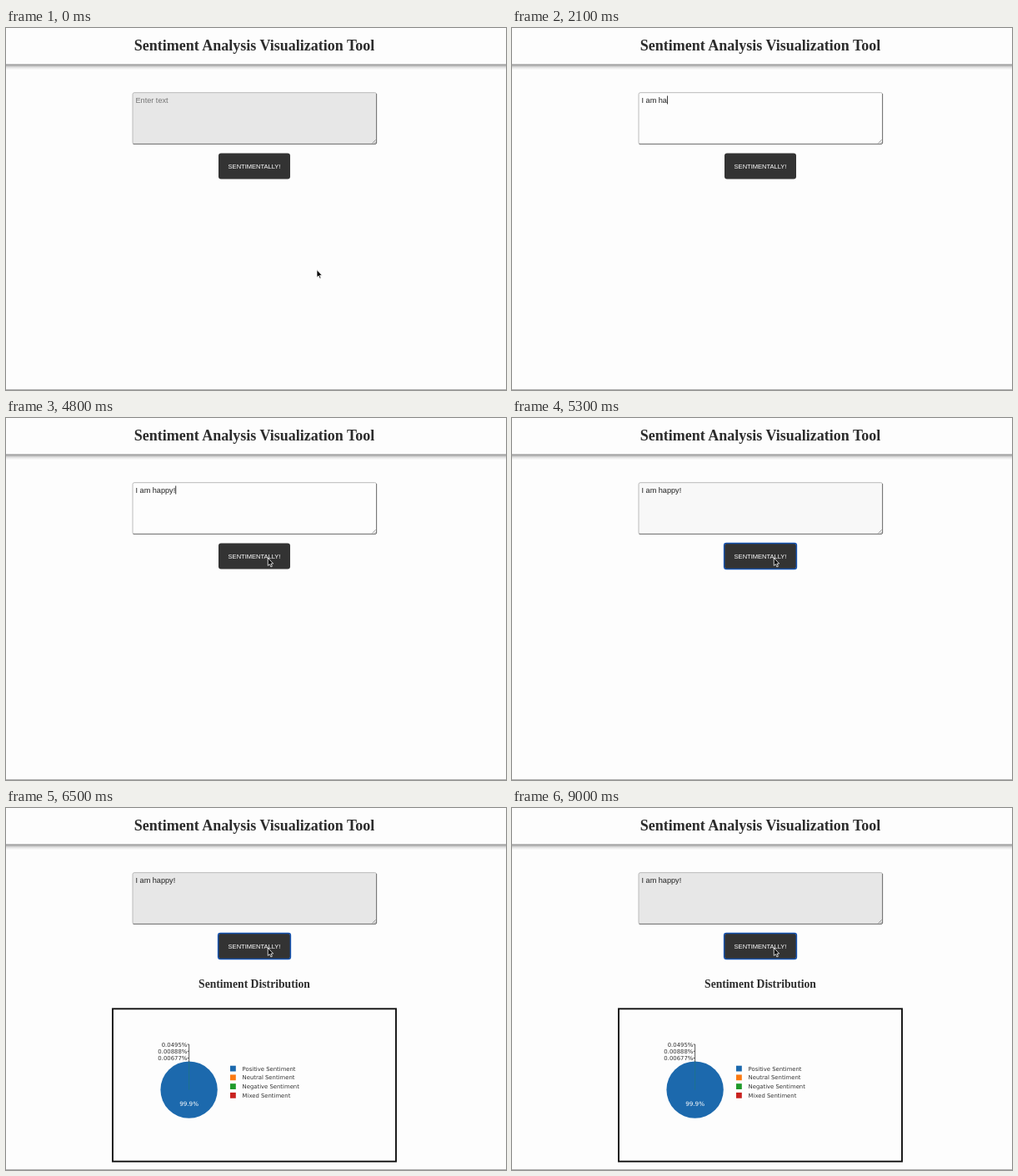
Animation, 600 px wide and 435 px high, one loop 9.1 s. Source, as an HTML page:

```html
<!DOCTYPE html>
<html lang="en">
<head>
<meta charset="utf-8">
<title>Sentiment Analysis Visualization Tool</title>
<style>
  html, body { margin: 0; width: 100%; height: 100%; overflow: hidden; background: #fdfdfd; }
  svg { display: block; width: 600px; height: 435px; }
  .serif { font-family: "Liberation Serif", serif; font-weight: bold; fill: #2c2c2c; text-anchor: middle; }
  .sans { font-family: "Liberation Sans", sans-serif; }
  .chart { font: 6.9px "DejaVu Sans", sans-serif; fill: #333; }
</style>
</head>
<body>
<svg viewBox="0 0 600 435">
  <defs>
    <linearGradient id="shadow" x2="0" y2="1">
      <stop offset="0" stop-color="#888"/>
      <stop offset=".25" stop-color="#b8b8b8"/>
      <stop offset=".6" stop-color="#e8e8e8"/>
      <stop offset="1" stop-color="#fdfdfd"/>
    </linearGradient>
  </defs>
  <rect width="600" height="435" fill="#fdfdfd"/>
  <rect y="43.5" width="600" height="7" fill="url(#shadow)"/>
  <text class="serif" x="298" y="27" font-size="18">Sentiment Analysis Visualization Tool</text>
  <path d="M0 434.5H600" stroke="#b0b0b0"/>

  <rect id="field" x="152" y="77.7" width="292.6" height="61.8" rx="2" stroke="#b4b4b4" stroke-width=".9"/>
  <path d="M152.6 139.4H443Q444.6 139.4 444.6 138V79" fill="none" stroke="#686868" stroke-width=".9"/>
  <path d="M439.5 138.5L443.7 134.3M442 138.5L443.7 136.8" stroke="#777" stroke-width=".7"/>
  <text id="entry" class="sans" x="155.5" y="89.6" font-size="9.15" xml:space="preserve"></text>
  <rect id="caret" y="81.5" width=".9" height="10" fill="#222"/>

  <rect x="255" y="150.5" width="86" height="31" rx="3" fill="#333"/>
  <rect id="ring" x="254.6" y="150.4" width="86.8" height="31.2" rx="2.5" fill="none" stroke="#1653b0" stroke-width="1.5"/>
  <text class="sans" x="298" y="168.6" font-size="7.53" fill="#fff" text-anchor="middle">SENTIMENTALLY!</text>

  <g id="results">
    <text class="serif" x="298" y="215.6" font-size="13.67">Sentiment Distribution</text>
    <rect x="128" y="241.3" width="340" height="183.4" fill="#fdfdfd" stroke="#111" stroke-width="1.9"/>
    <circle cx="219.6" cy="338.6" r="34.2" fill="#1c69ad"/>
    <path d="M219.6 338.6V304.5" stroke="#1f7a78" stroke-width=".6"/>
    <path d="M217.6 284H219.6V305M217.6 292.3H219.6M217.6 300.5H219.6" fill="none" stroke="#333" stroke-width=".8"/>
    <g id="labels" class="chart" text-anchor="end"></g>
    <text class="chart" x="219.6" y="358.4" style="fill:#fff;font-size:7.2px" text-anchor="middle">99.9%</text>
    <g id="legend" class="chart"></g>
  </g>

  <path id="arrow" d="M0 0V9.2L2.1 7.3L3.6 10.7L5.1 10L3.6 6.8H6.4Z" fill="#000" stroke="#fff" stroke-width=".8"/>
  <path id="beam" d="M-2 -5Q0 -5 0 -4Q0 -5 2 -5M0 -4V4M-2 5Q0 5 0 4Q0 5 2 5" fill="none" stroke="#222" stroke-width=".9"/>
</svg>
<script>
const LOOP = 9100, STEP = 100;
const $ = id => document.getElementById(id);
const show = (id, on) => $(id).setAttribute('visibility', on ? 'visible' : 'hidden');
const ramp = (t, from, to) => Math.min(1, Math.max(0, (t - from) / (to - from)));

$('labels').innerHTML = ['0.0495%', '0.00888%', '0.00677%']
  .map((label, i) => `<text x="217.4" y="${286.8 + i * 8.25}">${label}</text>`).join('');
$('legend').innerHTML = [['Positive', '#1c69ad'], ['Neutral', '#fb7a12'], ['Negative', '#1f9a2a'], ['Mixed', '#c9221f']]
  .map(([name, color], i) => {
    const y = 313.1 + i * 10.75;
    return `<rect x="269" y="${y - 3.4}" width="6.8" height="6.8" fill="${color}"/>` +
      `<text x="283.6" y="${y + 2.4}" style="font-size:6.85px">${name} Sentiment</text>`;
  }).join('');

// [time, characters typed]
const typing = [[1000, 1], [1200, 2], [1300, 3], [1400, 4], [1600, 5], [2000, 6],
  [2100, 7], [2800, 8], [2900, 9], [3100, 10], [3800, 11]];
// [from, to] while the caret is lit
const caretOn = [[500, 2600], [2800, 3600], [3800, 4300], [4800, 5300]];
// [time, x, y] of the pointer
const pointer = [[0, 373, 290.5], [100, 364, 268], [200, 343, 218], [300, 319, 163], [400, 302, 126],
  [500, 297, 115], [4000, 297, 115], [4100, 322, 119], [4200, 350, 133], [4300, 360, 154],
  [4400, 334, 166], [4500, 314.3, 168.2]];

function pointerAt(t) {
  const next = pointer.findIndex(p => p[0] > t);
  if (next < 0) return pointer.at(-1).slice(1);
  const [t0, x0, y0] = pointer[next - 1], [t1, x1, y1] = pointer[next];
  const k = ramp(t, t0, t1);
  return [x0 + (x1 - x0) * k, y0 + (y1 - y0) * k];
}

function draw(now) {
  const t = Math.floor(now % LOOP / STEP) * STEP;

  const focus = ramp(t, 200, 500) - ramp(t, 5200, 5600);
  const shade = Math.round(231 + 22 * focus);
  $('field').setAttribute('fill', `rgb(${shade},${shade},${shade})`);

  const count = typing.filter(([at]) => at <= t).length;
  const entry = $('entry');
  entry.textContent = count ? 'I am happy!'.slice(0, count) : 'Enter text';
  entry.setAttribute('fill', count ? '#222' : '#757575');
  $('caret').setAttribute('x', 155.6 + (count ? entry.getComputedTextLength() : 0));
  show('caret', caretOn.some(([from, to]) => t >= from && t < to));

  show('ring', t >= 5300);
  show('results', t >= 6500);

  const [x, y] = pointerAt(t);
  const hidden = t >= 1000 && t < 4100;
  const overField = x > 152 && x < 445 && y > 77 && y < 140;
  for (const id of ['arrow', 'beam']) {
    $(id).setAttribute('transform', `translate(${x} ${y})`);
    show(id, !hidden && overField === (id === 'beam'));
  }
  requestAnimationFrame(() => draw(performance.now() - start));
}

const start = performance.now();
draw(0);
</script>
</body>
</html>
```
